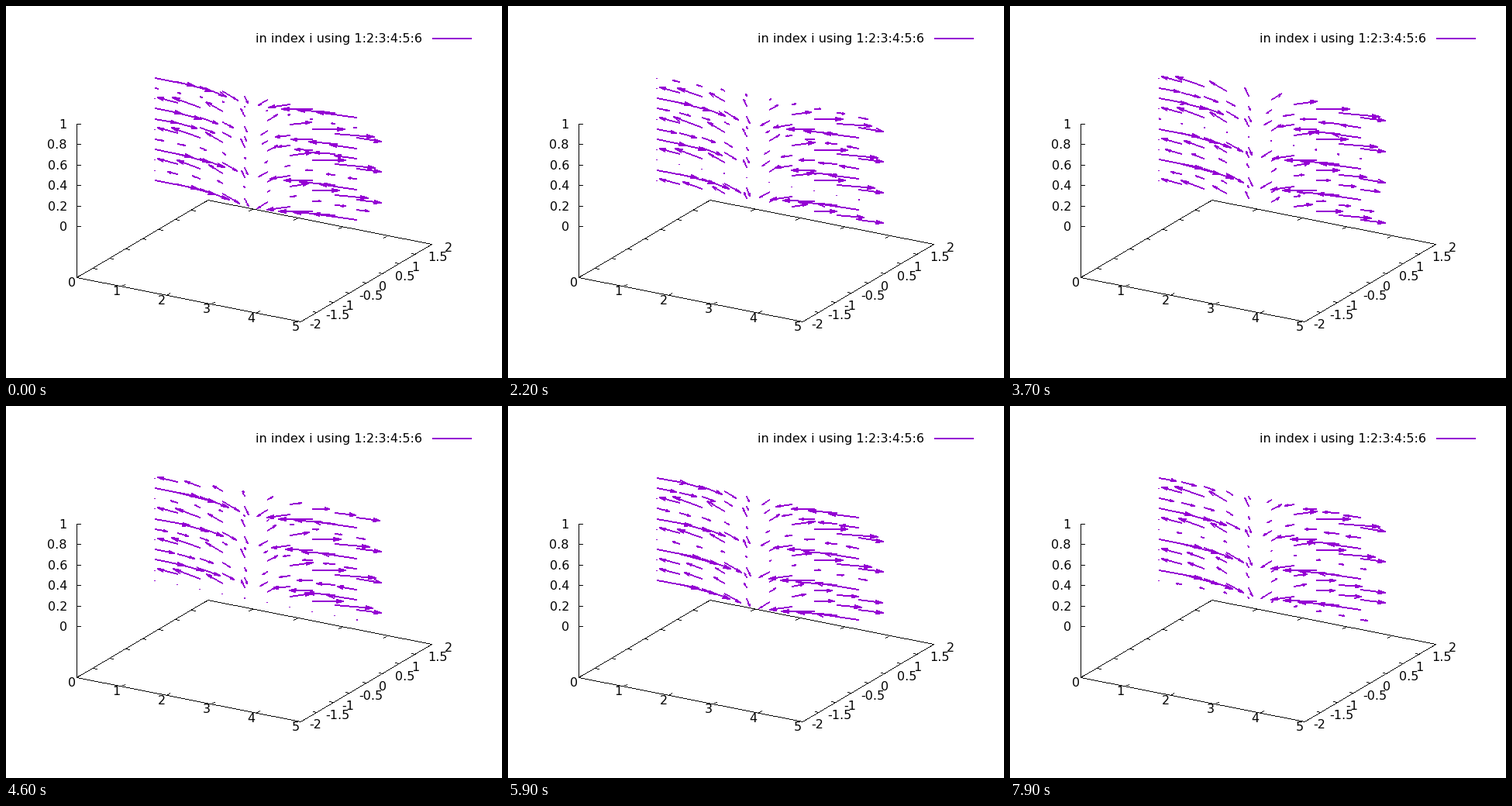
Write a matplotlib script that moves like this. It is 640 by 480 pixels and loops after 8 s.

```python
import numpy as np
import matplotlib.pyplot as plt
from matplotlib.animation import FuncAnimation

W, H, DPI = 640, 480, 100
FONT = 16 * 72 / DPI
BLACK, VIOLET = (0, 0, 0), (148, 0, 211)
FRAMES, INTERVAL = 80, 100

# Screen position of the plot corner and of one unit along each axis
CORNER = np.array([91, 350])
EX = np.array([57.8, 11.4])
EY = np.array([42.25, -24.9])
EZ = np.array([0.0, -132.0])
Z_BASE = 66
FIELD = np.array([192.3, 224.8])

# Wave: mode amplitudes, wave number along z, phase step per frame
AX, AY = 0.975, 0.316
K = 19.385
STEP = 0.1

HEAD_COS, HEAD_SIN = 0.979, 0.204
HEAD_MAX, HEAD_MIN = 10, 1.5

plt.rcParams["font.family"] = "DejaVu Sans"
fig = plt.figure(figsize=(W / DPI, H / DPI), dpi=DPI, facecolor="white")
ax = fig.add_axes([0, 0, 1, 1])
ax.axis("off")


def stroke(canvas, p, q, color, width=1):
    """Draw a hard-edged line, thickened across its main direction."""
    p, q = np.rint(p), np.rint(q)
    d = q - p
    n = int(np.abs(d).max())
    t = np.arange(n + 1) / max(n, 1)
    x = np.rint(p[0] + t * d[0]).astype(int)
    y = np.rint(p[1] + t * d[1]).astype(int)
    steep = abs(d[1]) >= abs(d[0])
    for k in range(-(width // 2), width - width // 2):
        if steep:
            canvas[y, x + k] = color
        else:
            canvas[y + k, x] = color


def label(x, y, s, ha):
    ax.text(x, y + 6, s, ha=ha, va="baseline", fontsize=FONT, color="black")


def floor_point(x, y):
    return CORNER + x * EX + (y + 2) * EY


def draw_axes(canvas):
    a, b = floor_point(0, -2), floor_point(5, -2)
    c, d = floor_point(5, 2), floor_point(0, 2)
    segs = [(a, b), (b, c), (c, d), (d, a), (a, a - [0, 198])]
    tick_x = 5 * EX / np.hypot(*EX)
    tick_y = 5 * EY / np.hypot(*EY)

    for x in range(6):
        front, back = floor_point(x, -2), floor_point(x, 2)
        segs += [(front, front + tick_y), (back, back - tick_y)]
        label(front[0] - 6, front[1] + 6, f"{x}", "center")

    for y in np.arange(-2, 2.1, 0.5):
        right, left = floor_point(5, y), floor_point(0, y)
        segs += [(right, right - tick_x), (left, left + tick_x)]
        gap = 11.5 if y < 0 else 16.5
        label(right[0] + gap, right[1] + 3.5, f"{y:g}", "left")

    for z in np.arange(6) / 5:
        p = CORNER - [0, Z_BASE] + z * EZ
        segs.append((p, p + [5, 0]))
        label(79, p[1], f"{z:g}", "right")

    for p, q in segs:
        stroke(canvas, p, q, BLACK)


def arrow(canvas, start, vec):
    tip = start + vec
    stroke(canvas, start, tip, VIOLET, 2)
    size = np.hypot(*vec)
    if size < 1:
        return
    dx, dy = vec / size * max(HEAD_MIN, min(0.3 * size, HEAD_MAX))
    for s in (HEAD_SIN, -HEAD_SIN):
        barb = np.array([HEAD_COS * dx - s * dy, HEAD_COS * dy + s * dx])
        stroke(canvas, tip - barb, tip, VIOLET, 2)


def draw_field(canvas, i):
    for n in range(11):
        z = n / 10
        s = np.cos(K * z - STEP * (i + 1))
        for x in np.arange(10) / 2:
            u = AX * np.cos(np.pi * x / 5) * s
            v = -AY * np.sin(np.pi * x / 5) * s
            # Cut the arrow where it leaves the x range
            end = min(max(x + u, 0), 5)
            cut = (end - x) / u if abs(u) > 1e-9 else 1
            arrow(canvas, FIELD + x * EX + z * EZ, cut * (u * EX + v * EY))


base = np.full((H, W, 3), 255, np.uint8)
draw_axes(base)
label(322, 41, "in index i using 1:2:3:4:5:6", "left")
stroke(base, (550, 42), (600, 42), VIOLET, 2)
image = ax.imshow(base, extent=(0, W, H, 0), aspect="auto",
                  interpolation="nearest")


def update(i):
    canvas = base.copy()
    draw_field(canvas, i)
    image.set_data(canvas)
    return [image]


anim = FuncAnimation(fig, update, frames=FRAMES, interval=INTERVAL, repeat=True)
plt.show()
```
